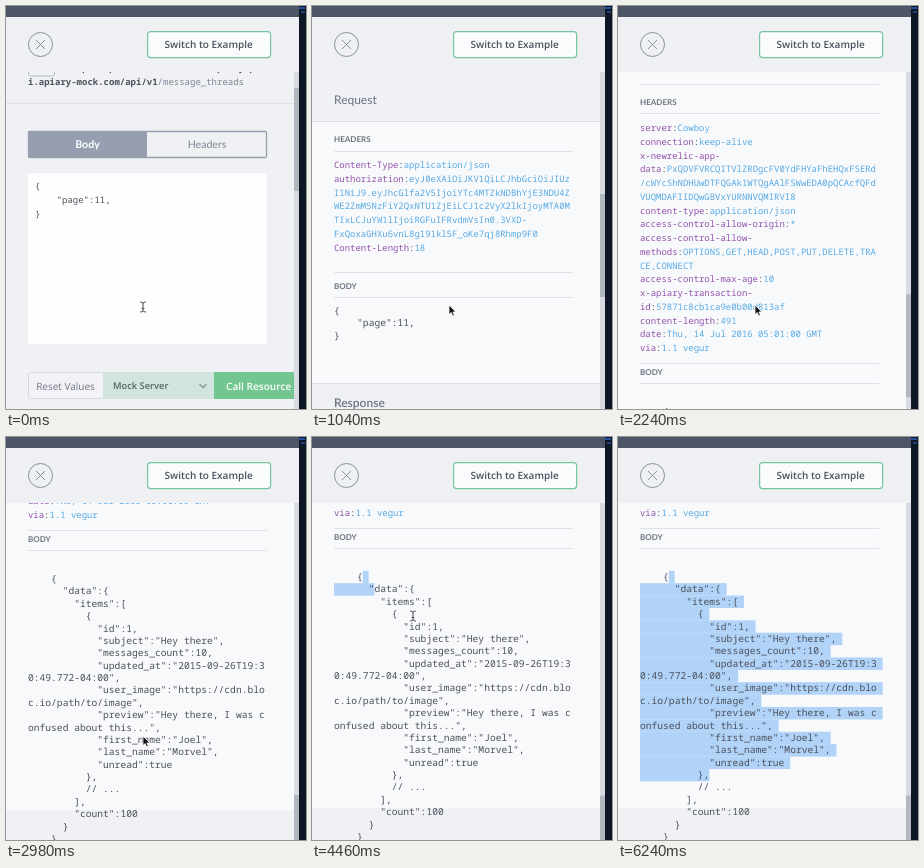
An HTML page that plays this animation: 300 by 403 pixels, repeating every 6690 ms.

```html
<!DOCTYPE html>
<html lang="en">
<head>
<meta charset="utf-8">
<title>API console</title>
<style>
html, body { margin: 0; width: 100%; height: 100%; overflow: hidden; background: #f0f1f5; }
svg { display: block; width: 100vw; height: 100vh; }
text { white-space: pre; text-rendering: geometricPrecision; }
.mono { font-family: "Noto Sans Mono", "DejaVu Sans Mono", monospace; }
.ui { font-family: "Open Sans", "Noto Sans", sans-serif; }
.label { font-family: Lato, "Open Sans", sans-serif; }
</style>
</head>
<body>
<svg id="stage" viewBox="0 0 300 403" preserveAspectRatio="none">
  <defs><clipPath id="view"><rect y="66" width="293" height="337"/></clipPath></defs>
  <rect width="300" height="403" fill="#f0f1f5"/>
  <g clip-path="url(#view)">
    <g id="page"></g>
    <rect x="288" y="66" width="5" height="337" fill="#d9dbe2"/>
    <rect id="thumb" x="288" y="82" width="5" height="103" fill="#b3b7c2"/>
  </g>
  <g id="frame"></g>
  <g id="beam" fill="none" stroke-linecap="round">
    <path id="beamPath" d="M-2.5-5Q0-5 0-3.5Q0-5 2.5-5M0-3.5V3.5M-2.5 5Q0 5 0 3.5Q0 5 2.5 5M-1 1.5H1" stroke="#4a4d55"/>
  </g>
  <path id="arrow" d="M0 0V9.5L2.2 7.6L3.7 11L5.4 10.2L3.9 7H6.8Z" fill="#111" stroke="#fff" stroke-width=".8"/>
</svg>
<script>
const LOOP = 6690;
const $ = id => document.getElementById(id);
const page = $('page'), frame = $('frame');

function add(parent, tag, attrs, content) {
  const el = document.createElementNS('http://www.w3.org/2000/svg', tag);
  for (const k in attrs) el.setAttribute(k, attrs[k]);
  if (content !== undefined) el.textContent = content;
  parent.appendChild(el);
  return el;
}
const box = (g, x, y, w, h, fill, more) =>
  add(g, 'rect', { x, y, width: w, height: h, fill, ...more });
const rule = (y, x = 22, w = 239) => box(page, x, y, w, 1, '#dfe1e7');
const write = (g, cls, x, y, size, fill, str, more) =>
  add(g, 'text', { class: cls, x, y, 'font-size': size, fill, ...more }, str);
const middle = { 'text-anchor': 'middle' };
const semi = { 'font-weight': 600 };
const bold = { 'font-weight': 700 };

const INK = '#4c505c', GREY = '#7d8494', SLATE = '#979eaf';
const HEAD_SIZE = 8.95, HEAD_STEP = 13.75;
const JSON_SIZE = 9.63, JSON_STEP = 12.38, COL = JSON_SIZE * 0.6;
const JSON_TOP = 1184;

function tabs(y, edges, names) {
  const last = edges.length - 1;
  box(page, edges[0], y, edges[1] - edges[0], 27, SLATE);
  box(page, edges[0] + .5, y + .5, edges[last] - edges[0] - 1, 26, 'none',
    { stroke: SLATE, 'stroke-width': 1.3, rx: 1.5 });
  names.forEach((name, i) => {
    if (i > 1) box(page, edges[i], y, 1, 27, SLATE);
    write(page, 'label', (edges[i] + edges[i + 1]) / 2, y + 17, 10.6,
      i ? GREY : '#fff', name, { ...middle, 'font-weight': i ? 400 : 700 });
  });
}

// Each line is "key|value"; wrapped lines have one side empty.
function headers(y, lines) {
  lines.forEach((line, i) => {
    const [key, value] = line.split('|');
    const t = write(page, 'mono', 22, y + 3 + i * HEAD_STEP, HEAD_SIZE, INK, '');
    const colon = key.endsWith(':');
    add(t, 'tspan', { fill: '#9250ab' }, colon ? key.slice(0, -1) : key);
    if (colon) add(t, 'tspan', {}, ':');
    add(t, 'tspan', { fill: '#57a9e4' }, value);
  });
}
const code = (x, y, size, step, lines) => lines.forEach((line, i) =>
  write(page, 'mono', x, y + 3 + i * step, size, INK, line));
const caption = (y, str) => write(page, 'label', 22, y + 3, 8, '#6d7280', str, bold);

// Request form
box(page, 0, 515, 293, 900, '#f8f9fb');
box(page, 22.5, 50, 26, 20, 'none', { stroke: '#b4b8c2', rx: 2 });
write(page, 'mono', 60, 65, 9, INK, 'https://private-29ef5-bloc.apiary-p', bold);
const url = write(page, 'mono', 22, 79, 9, INK, '');
add(url, 'tspan', bold, 'i.apiary-mock.com/api/v1');
add(url, 'tspan', { fill: GREY }, '/message_threads');
rule(97, 0, 288);
tabs(125, [22, 141, 261], ['Body', 'Headers']);
box(page, 22, 167, 239, 171, '#fefefe', { rx: 2 });
const sample = ['{', '    "page":11,', '}'];
code(29, 180, 9, 13.8, sample);

box(page, 22.5, 366.5, 75, 26, '#f3f3f7', { stroke: '#d6d8e0', rx: 2 });
write(page, 'ui', 59.5, 383.5, 10, '#6f7584', 'Reset Values', middle);
box(page, 97, 366, 111, 27, '#d1e4de');
write(page, 'ui', 107, 383.3, 9.3, '#526863', 'Mock Server', semi);
add(page, 'path', { d: 'M193.5 378l3.5 3.5l3.5-3.5', fill: 'none', stroke: '#7f9c94', 'stroke-width': 1.3 });
box(page, 208, 366, 85, 27, '#73c68f');
write(page, 'ui', 220, 383.5, 10.1, '#fff', 'Call Resource', semi);

// Sent request
tabs(421, [22, 101, 179, 261], ['Sent', 'Compare', 'Code Example']);
write(page, 'label', 22, 498, 12, '#6b7180', 'Request');
rule(515, 0, 288);
caption(533, 'HEADERS');
rule(545);
headers(559, [
  'Content-Type:|application/json',
  'authorization:|eyJ0eXAiOiJKV1QiLCJhbGciOiJIUz',
  '|I1NiJ9.eyJhcGlfa2V5IjoiYTc4MTZkNDBhYjE3NDU4Z',
  '|WE2ZmM5NzFiY2QxNTU1ZjEiLCJ1c2VyX2lkIjoyMTA0M',
  '|TIxLCJuYW1lIjoiRGFuIFRvdmVsIn0.3VXD-',
  '|FxQoxaGHXu6vnL8g191kl5F_oKe7qj8Rhmp9F0',
  'Content-Length:|18'
]);
rule(666);
caption(680, 'BODY');
rule(691);
code(22, 705, JSON_SIZE, JSON_STEP, sample);

// Response
box(page, 0, 777, 293, 40, '#eff0f4');
rule(777, 0, 288);
rule(817, 0, 288);
write(page, 'label', 22, 801, 12, '#6b7180', 'Response', semi);
write(page, 'label', 22, 839.3, 9.3, GREY, '200');
rule(856);
caption(874, 'HEADERS');
rule(885);
headers(900, [
  'server:|Cowboy',
  'connection:|keep-alive',
  'x-newrelic-app-|',
  'data:|PxQDVFVRCQITVlZRDgcFV0YdFHYaFhEHQxFSERd',
  '|/cWYcShNDHUwDTFQGAk1WTQgAAlFSWwEDA0pQCAcfQFd',
  '|VUQMDAFIIDQwGBVxYURNNVQMIRVI8',
  'content-type:|application/json',
  'access-control-allow-origin:|*',
  'access-control-allow-|',
  'methods:|OPTIONS,GET,HEAD,POST,PUT,DELETE,TRA',
  '|CE,CONNECT',
  'access-control-max-age:|10',
  'x-apiary-transaction-|',
  'id:|57871c8cb1ca9e0b00d813af',
  'content-length:|491',
  'date:|Thu, 14 Jul 2016 05:01:00 GMT',
  'via:|1.1 vegur'
]);
rule(1135);
caption(1144, 'BODY');
rule(1155);

const pad = (n, lines) => lines.map(s => ' '.repeat(n) + s);
const reply = [
  '    {',
  '      "data":{',
  '        "items":[',
  '          {',
  ...pad(12, ['"id":1,', '"subject":"Hey there",', '"messages_count":10,', '"updated_at":"2015-09-26T19:3']),
  '0:49.772-04:00",',
  '            "user_image":"https://cdn.blo',
  'c.io/path/to/image",',
  '            "preview":"Hey there, I was c',
  'onfused about this...",',
  ...pad(12, ['"first_name":"Joel",', '"last_name":"Morvel",', '"unread":true']),
  '          },',
  '          // ...',
  '        ],',
  '        "count":100',
  '      }',
  '    }'
];
const marks = reply.map((line, i) =>
  box(page, 22, JSON_TOP - 6.2 + i * JSON_STEP, 0, JSON_STEP + .1, '#b1d3f8'));
code(22, JSON_TOP, JSON_SIZE, JSON_STEP, reply);

// Fixed window parts
box(frame, 0, 11, 293, 55, '#eef0f4');
box(frame, 0, 0, 293, 11, '#4d5566');
add(frame, 'circle', { cx: 34.5, cy: 38.5, r: 12, fill: 'none', stroke: '#8b909c' });
add(frame, 'path', { d: 'M30 34l9 9M39 34l-9 9', stroke: '#8b909c' });
box(frame, 141.6, 25.6, 123, 26, '#fafbfc', { stroke: '#78c4a0', 'stroke-width': 1.2, rx: 3 });
write(frame, 'ui', 202.7, 42, 10, '#4a505e', 'Switch to Example', { ...middle, ...semi });
box(frame, 293, 0, 7, 403, '#0e1524');
box(frame, 293, 1, 6, 2, '#2450a0');
box(frame, 295, 5, 4, 2, '#1d4080');

// time, scroll, pointer kind, x, y, selection end line and column
const steps = [
  [0, 0, 'beam', 137, 301],
  [450, 50, 'beam', 137, 301],
  [600, 155, 'beam', 137, 301],
  [750, 265, 'arrow', 137, 299],
  [890, 345, 'arrow', 137, 299],
  [1040, 400, 'arrow', 137, 299],
  [1190, 440, 'arrow', 137, 299],
  [1340, 467, 'arrow', 137, 299],
  [1490, 485, 'arrow', 137, 299],
  [1640, 495, 'arrow', 137, 299],
  [1790, 499, 'arrow', 137, 299],
  [2090, 610, 'arrow', 137, 299],
  [2240, 778, 'arrow', 137, 299],
  [2390, 850, 'arrow', 137, 299],
  [2540, 876, 'arrow', 137, 299],
  [2830, 940, 'arrow', 137, 299],
  [2980, 1042, 'arrow', 137, 299],
  [3130, 1044, 'arrow', 137, 299],
  [3270, 1044, 'arrow', 128, 190],
  [3420, 1044, 'arrow', 110, 60],
  [3570, 1044, 'arrow', 95, 10],
  [3720, 1044, 'arrow', 62, 95],
  [3870, 1044, 'arrow', 50, 146],
  [4020, 1044, 'beam', 54, 152],
  [4460, 1044, 'beam', 101, 179, 1, 7],
  [4610, 1044, 'beam', 165, 270, 8, 17],
  [4750, 1044, 'beam', 191, 326, 14, 34],
  [5200, 1044, 'beam', 191, 332, 15, 26],
  [5350, 1044, 'beam', 191, 338, 16, 12],
  [5950, 1044, 'beam', 225, 317, 16, 12],
  [6090, 1044, 'beam', 247, 362, 16, 12],
  [6240, 1044, 'none', 0, 0, 16, 12]
];

let shown;
function show(step) {
  if (step === shown) return;
  shown = step;
  const [, scroll, kind, x, y, endLine = -1, endCol = 0] = step;
  page.setAttribute('transform', `translate(0 ${-scroll})`);
  $('thumb').setAttribute('y', 82 + scroll * .265);
  for (const id of ['beam', 'arrow']) {
    $(id).setAttribute('transform', `translate(${x} ${y})`);
    $(id).setAttribute('visibility', id === kind ? 'visible' : 'hidden');
  }
  marks.forEach((mark, i) => {
    const from = i ? 0 : 5;
    const to = i > endLine ? from : i === endLine ? endCol : reply[i].length + 1;
    mark.setAttribute('x', 22 + from * COL);
    mark.setAttribute('width', (to - from) * COL);
  });
}

function tick() {
  const t = performance.now() % LOOP;
  show(steps.findLast(s => s[0] <= t));
  requestAnimationFrame(tick);
}
tick();
</script>
</body>
</html>
```
